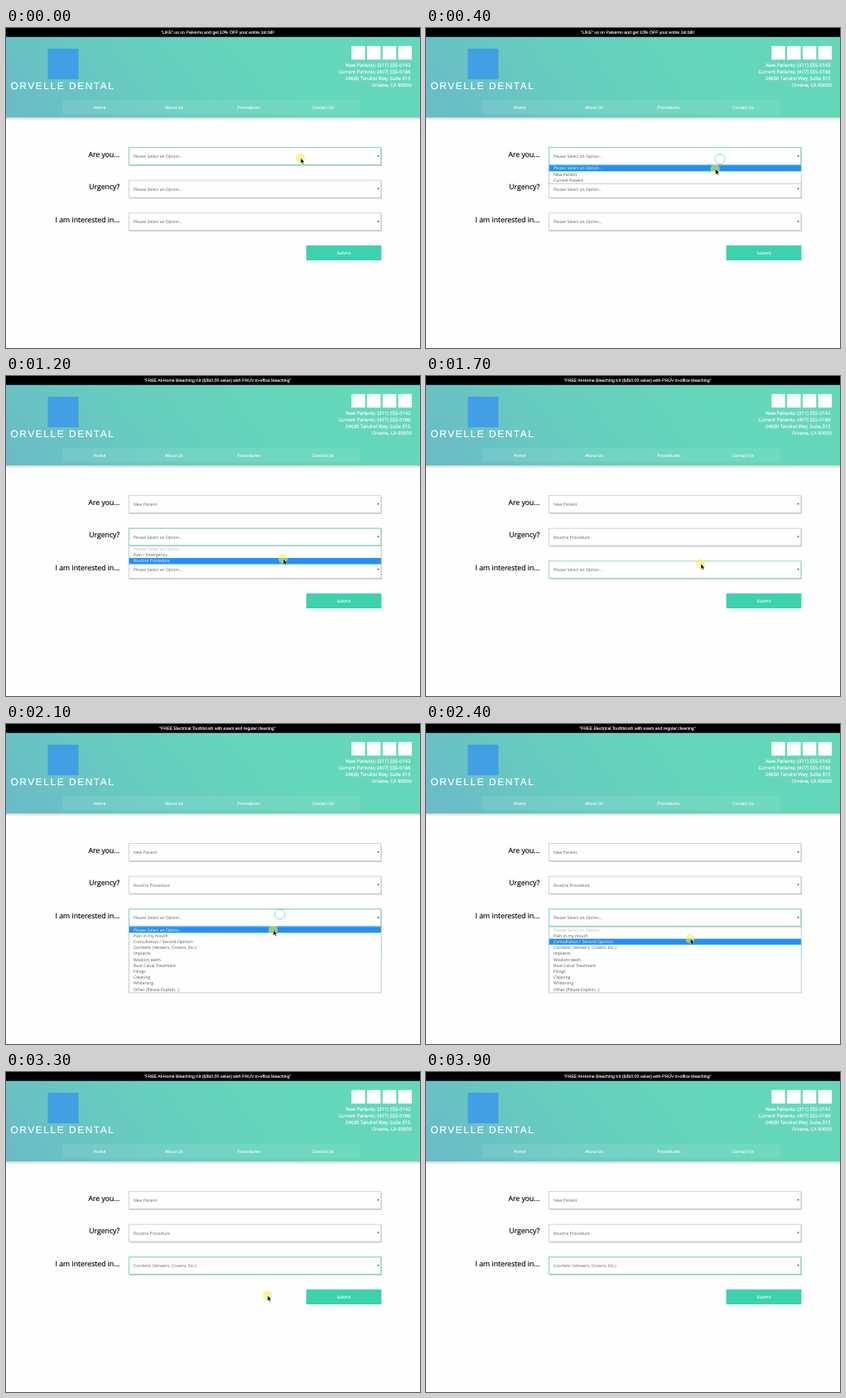
An HTML page for the animation above (4 s loop, 500 by 387 pixels).

```html
<!DOCTYPE html>
<html lang="en">
<head>
<meta charset="utf-8">
<title>Appointment form</title>
<style>
  html, body { margin: 0; width: 100%; height: 100%; overflow: hidden; background: #fefefe; }
  svg { display: block; width: 500px; height: 387px; }
  text { font-family: "Open Sans", sans-serif; text-rendering: geometricPrecision; white-space: pre; }
  .bar { font: 5.2px "Liberation Sans", Arial, sans-serif; fill: #fff; stroke: #fff; stroke-width: .12; text-anchor: middle; }
  .brand { font: 12px "Liberation Sans", Arial, sans-serif; letter-spacing: 1.5px; fill: #fff; stroke: #fff; stroke-width: .2; }
  .contact { font-size: 5.8px; fill: #fff; stroke: #fff; stroke-width: .14; text-anchor: end; }
  .nav { font-size: 5.2px; fill: #fff; stroke: #fff; stroke-width: .1; text-anchor: middle; }
  .label { font-size: 8.7px; fill: #000; stroke: #000; stroke-width: .16; text-anchor: end; }
  .field { font-size: 5.05px; fill: #626262; }
</style>
</head>
<body>
<svg id="stage" viewBox="0 0 500 387">
  <defs>
    <linearGradient id="sea" gradientUnits="userSpaceOnUse" x1="0" y1="108" x2="260" y2="-80">
      <stop offset="0" stop-color="#6abac7"/>
      <stop offset=".5" stop-color="#66cdbf"/>
      <stop offset="1" stop-color="#64d7ba"/>
    </linearGradient>
    <linearGradient id="shade" x2="0" y2="1">
      <stop offset="0" stop-color="#888" stop-opacity=".4"/>
      <stop offset="1" stop-color="#999" stop-opacity="0"/>
    </linearGradient>
  </defs>
  <rect width="500" height="387" fill="#fefefe"/>
  <rect y="108" width="500" height="4" fill="url(#shade)"/>
  <rect y="10" width="500" height="98" fill="url(#sea)"/>
  <rect width="500" height="10.8" fill="#000"/>
  <text id="promo" class="bar" x="255.4" y="7.1"></text>
  <rect x="50.5" y="25" width="37" height="37" fill="#429fe4"/>
  <text class="brand" x="5.5" y="73.7">ORVELLE DENTAL</text>
  <g id="page"></g>
  <g id="menu"></g>
  <circle id="ripple" fill="none" stroke="#45cfa5" stroke-width=".9"/>
  <g id="pointer">
    <circle r="5.6" cx="-.5" cy="-.3" fill="#f6f03a" opacity=".56"/>
    <path d="M0 0V6.2L1.5 4.9L2.6 7.2L3.6 6.7L2.6 4.5H4.5Z" fill="#000" stroke="#fff" stroke-width=".35"/>
  </g>
</svg>
<script>
const LOOP = 4000, STEP = 100, ROW = 7.2;
const $ = id => document.getElementById(id);
const rect = (x, y, w, h, attrs) => `<rect x="${x}" y="${y}" width="${w}" height="${h}" ${attrs}/>`;
const text = (cls, x, y, str, attrs = '') => `<text class="${cls}" x="${x}" y="${y}" ${attrs}>${str}</text>`;

const like = '"LIKE" us on Palverno and get 10% OFF your entire 1st bill!';
const bleach = '"FREE At-Home Bleaching Kit ($350.00 value) with PRUV in-office bleaching"';
const brush = '"FREE Electrical Toothbrush with exam and regular cleaning"';
const promos = [like, bleach, brush, bleach];

const contact = [
  ['New Patients: (311) 555-0142', 488.5], ['Current Patients: (407) 555-0186', 488.5],
  ['24630 Tandrel Way, Suite 315', 488.5], ['Orvane, CA 90000', 489.8]
];

// focus: border lit from/to; open: menu shown from/to
const ask = 'Please Select an Option...';
const fields = [
  { label: 'Are you...', y: 144.6, focus: [-200, 700], open: [200, 500], pick: 1,
    options: [ask, 'New Patient', 'Current Patient'] },
  { label: 'Urgency?', y: 184.2, focus: [600, 1500], open: [900, 1300], pick: 2,
    options: [ask, 'Pain / Emergency', 'Routine Procedure'] },
  { label: 'I am interested in...', y: 223.8, focus: [1600, 4200], open: [1800, 2900], pick: 3,
    options: [ask, 'Pain in my mouth', 'Consultation / Second Opinion', 'Cosmetic (Veneers, Crowns, Etc.)',
      'Implants', 'Wisdom teeth', 'Root Canal Treatment', 'Filings', 'Cleaning', 'Whitening',
      'Other (Please Explain...)'] }
];

// time, x, y
const path = [
  [0, 356, 157.6], [200, 355, 158.5], [500, 347, 177], [800, 345, 189.8], [900, 344, 193],
  [1200, 335, 221.5], [1350, 334.5, 222.5], [1900, 330.7, 230], [2100, 323, 249.6], [2700, 316, 270.6], [4000, 316, 270.6]
];
const clicks = [200, 500, 900, 1300, 1900, 2800];
const RIPPLE = 250, HIDE = 3700;

function locate(t) {
  const i = Math.max(1, path.findIndex(p => p[0] >= t));
  const [t0, x0, y0] = path[i - 1], [t1, x1, y1] = path[i];
  const k = (t - t0) / (t1 - t0);
  return [x0 + (x1 - x0) * k, y0 + (y1 - y0) * k];
}

function buildPage() {
  let out = '';
  for (let i = 0; i < 4; i++) out += rect(417.3 + i * 18.8, 21.8, 16.4, 16.4, 'fill="#fff"');
  contact.forEach(([line, x], i) => out += text('contact', x, 47.3 + i * 8, line));
  out += rect(68, 87, 360, 17, 'fill="#fff" fill-opacity=".08"');
  ['Home', 'About Us', 'Procedures', 'Contact Us'].forEach((item, i) => {
    out += text('nav', 113 + i * 90, 98.1, item);
    if (i) out += rect(67.8 + i * 90, 87, .4, 17, 'fill="#fff" fill-opacity=".15"');
  });
  fields.forEach((f, i) => {
    const y = f.y;
    out += text('label', 137.3, y + 11.2, f.label)
      + rect(149.2, y + .9, 304.8, 21.5, 'fill="#cdd3d4"')
      + rect(148.5, y, 304.4, 20.8, 'fill="#fefefe" stroke="#cbd0d1" stroke-width=".9"')
      + rect(148.5, y, 304.4, 20.8, `id="glow${i}" fill="none" stroke="#7ed6bf" stroke-width=".9"`)
      + text('field', 154, y + 12.4, '', `id="value${i}"`)
      + `<path d="M448.5 ${y + 9.4}h2.2l-1.1 2z" fill="#333"/>`;
  });
  out += rect(362.6, 263, 90.8, 18, 'fill="#3cd2ad"') + text('nav', 408, 274.4, 'Submit');
  $('page').innerHTML = out;
}

function menuMarkup(f, pointerY) {
  const top = f.y + 21.4, h = f.options.length * ROW;
  const hover = Math.max(0, Math.floor((pointerY - top) / ROW));
  let out = rect(148.4, top, 304.8, h + .6, 'fill="#fefefe" stroke="#9fb9d2" stroke-width=".7"');
  f.options.forEach((option, i) => {
    const y = top + i * ROW, on = i === hover;
    if (on) out += rect(148.7, y + .1, 304.2, ROW, 'fill="#1e90ff"');
    out += text('field', 154, y + 5.4, option, `style="fill:${on ? '#fff' : i ? '#555' : '#bbb'}"`);
  });
  return out;
}

const within = (t, [from, to]) => t >= from && t < to;
const clamp = v => Math.min(1, Math.max(0, v));

function render(t) {
  const [x, y] = locate(t);
  $('promo').textContent = promos[Math.floor(t / 1000)];
  fields.forEach((f, i) => {
    $('value' + i).textContent = f.options[t >= f.open[1] ? f.pick : 0];
    const [on, off] = f.focus;
    $('glow' + i).style.opacity = Math.min(clamp((t - on) / 200), clamp(1 - (t - off) / 200));
  });
  const open = fields.find(f => within(t, f.open));
  $('menu').innerHTML = open ? menuMarkup(open, y) : '';

  const click = clicks.find(c => within(t, [c, c + RIPPLE]));
  const ripple = $('ripple');
  ripple.style.display = click === undefined ? 'none' : '';
  if (click !== undefined) {
    const age = (t - click) / RIPPLE;
    const [cx, cy] = locate(click);
    ripple.setAttribute('cx', cx);
    ripple.setAttribute('cy', cy);
    ripple.setAttribute('r', 2.5 + age * 4.5);
    ripple.style.opacity = 1 - age * .4;
  }
  $('pointer').setAttribute('transform', `translate(${x} ${y})`);
  $('pointer').style.display = t < HIDE ? '' : 'none';
}

buildPage();
let start, last = -1;
function tick(now) {
  start ??= now;
  const t = Math.floor(((now - start) % LOOP) / STEP) * STEP;
  if (t !== last) render(last = t);
  requestAnimationFrame(tick);
}
render(0);
requestAnimationFrame(tick);
</script>
</body>
</html>
```
